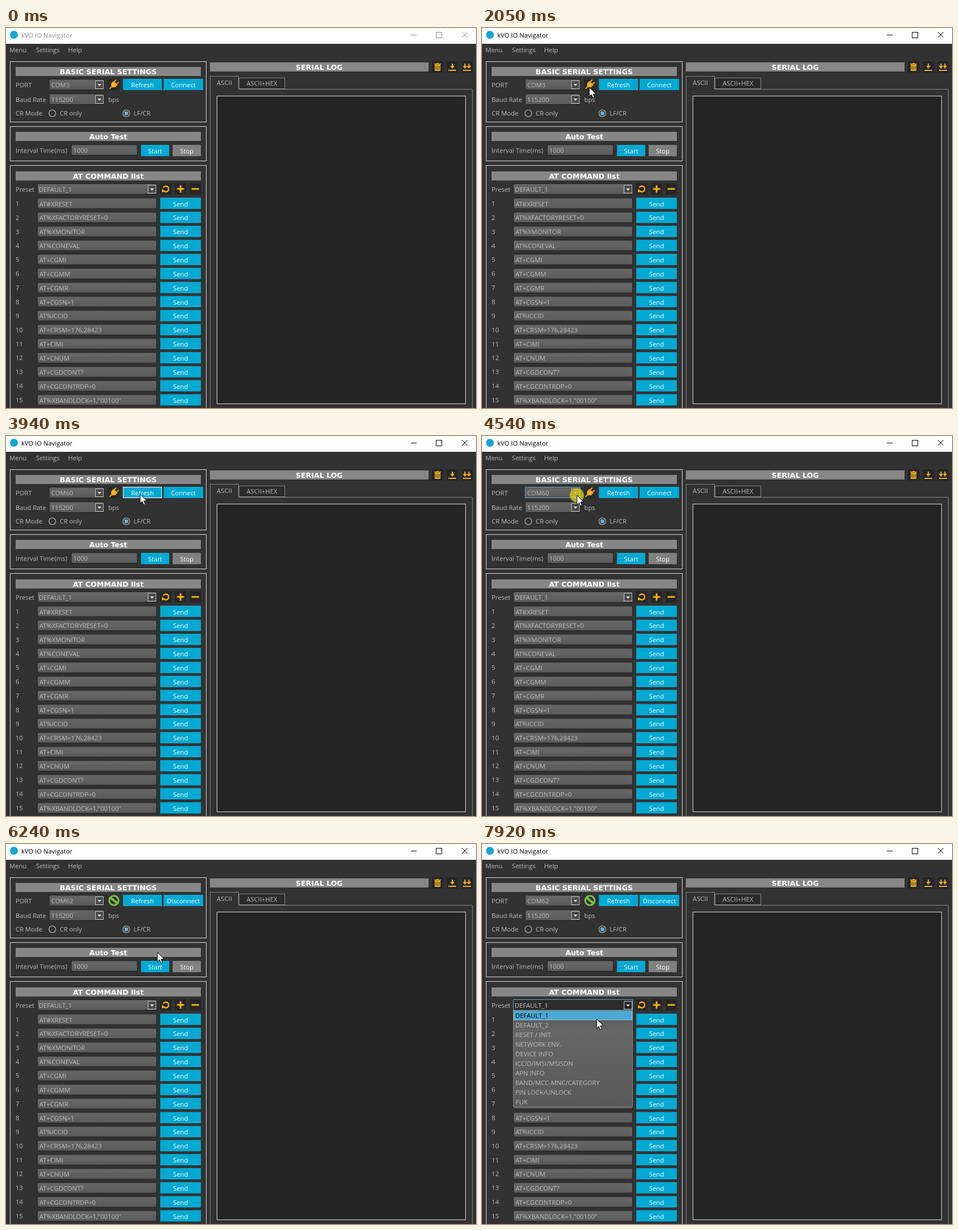
These frames come from a looping animation (832 by 673 pixels, 7990 ms). An HTML page with a canvas:

```html
<!DOCTYPE html>
<html>
<head>
<meta charset="utf-8">
<style>
html, body { margin: 0; width: 100%; height: 100%; overflow: hidden; background: #323232; }
canvas { display: block; }
</style>
</head>
<body>
<canvas width="832" height="673"></canvas>
<script>
const c = document.querySelector('canvas').getContext('2d');
const LOOP = 7990, STEP = LOOP / 119;
const UI = '11.3px "Open Sans", "Noto Sans", sans-serif';
const HEAD = 'bold 12.7px "DejaVu Sans", sans-serif';
const BLUE = '#00a9d2', GOLD = '#f2b01e', GREEN = '#7cc243';
const LABEL = '#bdbdbd', EDGE = '#858585', GROUP = '#dcdcdc';

const COMMANDS = ['AT#XRESET', 'AT%XFACTORYRESET=0', 'AT%XMONITOR', 'AT%CONEVAL', 'AT+CGMI', 'AT+CGMM',
  'AT+CGMR', 'AT+CGSN=1', 'AT%ICCID', 'AT+CRSM=176,28423', 'AT+CIMI', 'AT+CNUM', 'AT+CGDCONT?',
  'AT+CGCONTRDP=0', 'AT%XBANDLOCK=1,"00100"'];
const PRESETS = ['DEFAULT_1', 'DEFAULT_2', 'RESET / INIT.', 'NETWORK ENV.', 'DEVICE INFO',
  'ICCID/IMSI/MSISDN', 'APN INFO', 'BAND/MCC-MNC/CATEGORY', 'PIN LOCK/UNLOCK', 'PUK'];
const PORTS = ['COM60', 'COM61', 'COM62', 'COM3'];

// The pointer rests on a few spots and glides between them
const START = { x: 790, y: 700 };
const STOPS = [
  { at: 465, x: 359, y: 162, travel: 460 },
  { at: 1450, x: 240, y: 95, travel: 800 },
  { at: 2030, x: 190, y: 105, travel: 380 },
  { at: 2330, x: 164, y: 104 },
  { at: 2730, x: 160, y: 114 },
  { at: 3270, x: 240, y: 112 },
  { at: 3600, x: 238, y: 103 },
  { at: 4150, x: 168, y: 105 },
  { at: 4880, x: 152, y: 149 },
  { at: 5800, x: 312, y: 100, travel: 560 },
  { at: 6210, x: 268, y: 192 },
  { at: 6780, x: 255, y: 276, travel: 480 },
  { at: 7180, x: 255, y: 285 },
  { at: 7920, x: 203, y: 310, travel: 120 }];
const CLICKS = [1320, 2500, 3600, 4560, 5110, 5880, 7400];
const CLICK_TIME = 140;

let mx, my;

const between = (t, a, b) => t >= a && t < b;
const over = (x, y, w, h) => mx >= x && mx < x + w && my >= y && my < y + h;
const clamp = v => Math.max(0, Math.min(1, v));
const ease = p => (1 - Math.cos(Math.PI * p)) / 2;

function rect(x, y, w, h, fill) {
  c.fillStyle = fill;
  c.fillRect(x, y, w, h);
}

function frame(x, y, w, h, color) {
  c.strokeStyle = color;
  c.lineWidth = 1;
  c.strokeRect(x + .5, y + .5, w - 1, h - 1);
}

function text(s, x, y, color = LABEL, align = 'left', font = UI) {
  c.font = font;
  c.textAlign = align;
  c.fillStyle = color;
  c.fillText(s, x, Math.round(y));
}

function trace(points) {
  c.beginPath();
  points.forEach(p => c.lineTo(...p));
}

function poly(points, fill) {
  trace(points);
  c.closePath();
  c.fillStyle = fill;
  c.fill();
}

function stroke(color, width = 1) {
  c.strokeStyle = color;
  c.lineWidth = width;
  c.stroke();
}

function line(points, color, width) {
  trace(points);
  stroke(color, width);
}

function disc(x, y, r, fill) {
  c.beginPath();
  c.arc(x, y, r, 0, 7);
  c.fillStyle = fill;
  c.fill();
}

function ring(x, y, r, color, width, from = 0, to = 2 * Math.PI) {
  c.beginPath();
  c.arc(x, y, r, from, to);
  stroke(color, width);
}

function shade(y, h) {
  const g = c.createLinearGradient(0, y, 0, y + h);
  g.addColorStop(0, '#565656');
  g.addColorStop(.2, '#666');
  g.addColorStop(1, '#595959');
  return g;
}

function heading(s, x, y, w) {
  rect(x, y, w, 16, '#878787');
  text(s, x + w / 2, y + 13, '#fff', 'center', HEAD);
}

function field(s, x, y, w, pad = 4) {
  c.beginPath();
  c.roundRect(x + .5, y + .5, w - 1, 19, 3);
  c.fillStyle = shade(y, 20);
  c.fill();
  stroke('#1e1e1e');
  text(s, x + pad, y + 15, LABEL);
}

function button(s, x, y, w, fill = BLUE) {
  rect(x, y, w, 20, fill);
  if (over(x, y, w, 20)) frame(x, y, w, 20, '#fff');
  text(s, x + w / 2, y + 15, '#fff', 'center');
}

function combo(s, x, y, w, open, pad = 4) {
  field(s, x, y, w, pad);
  if (open) {
    rect(x, y, w, 20, '#2b2b2b');
    text(s, x + pad, y + 15, '#c8c8c8');
  }
  if (open || over(x, y, w, 20)) frame(x, y, w, 20, '#58a8c4');
  const right = x + w;
  rect(right - 16, y + 3, 15, 15, open ? '#222' : '#4a4a4a');
  frame(right - 16, y + 3, 15, 15, '#c4c4c4');
  poly([[right - 12, y + 9], [right - 5, y + 9], [right - 8.5, y + 13]], '#ddd');
}

// Drop-down whose bottom edge slides down, revealing rows from the end
function list(items, x, y, w, step, height = items.length * step) {
  const first = y + height - items.length * step;
  c.save();
  c.beginPath();
  c.rect(x, y, w, height + 1);
  c.clip();
  rect(x, y, w, height + 1, shade(y, height));
  items.forEach((s, i) => {
    const top = first + i * step, picked = over(x, Math.max(y, top), w, step);
    if (picked) {
      rect(x + 1, top, w - 2, step, '#49a9d2');
      c.setLineDash([1, 1]);
      frame(x + 1, top, w - 2, step, '#d8eef6');
      c.setLineDash([]);
    }
    text(s, x + 4, top + step / 2 + 4, picked ? '#000' : LABEL);
  });
  c.restore();
  frame(x, y, w, height + 1, EDGE);
}

function plug() {
  rect(-10, -10, 20, 20, '#292929');
  c.rotate(Math.PI / 4);
  rect(-1, 3, 2, 8, GOLD);
  rect(-5, -4, 10, 6, GOLD);
  disc(0, 1, 4.5, GOLD);
  for (const x of [-4, 2]) rect(x, -9, 2, 5, GOLD);
}

function linked() {
  ring(0, 0, 8.3, GREEN, 3);
  line([[-6, -5], [6, 5]], GREEN, 4);
}

function trash() {
  rect(-5, -4, 10, 11, GOLD);
  rect(-6, -6, 12, 1.5, GOLD);
  rect(-2, -7, 4, 1.5, GOLD);
  for (const x of [-3, 0, 3]) rect(x - .5, -2, 1, 7, '#2a2a2a');
}

function download(...xs) {
  for (const x of xs) {
    rect(x - 1, -6, 2, 5, GOLD);
    poly([[x - 4, -2], [x + 4, -2], [x, 3]], GOLD);
  }
  rect(-7, 5, 14, 2, GOLD);
}

function reload() {
  ring(0, 0, 5, GOLD, 2.5, -2.7, 2.3);
  poly([[-7, 0], [-1, 4], [-7, 6.5]], GOLD);
}

const minus = () => rect(-6.5, -1.5, 13, 3, GOLD);
function plus() {
  minus();
  rect(-1.5, -6.5, 3, 13, GOLD);
}

function at(x, y, draw) {
  c.save();
  c.translate(x, y);
  draw();
  c.restore();
}

function icons(x, y, draws) {
  draws.forEach((draw, i) => at(x + 26 * i, y, () => {
    rect(-10, -10, 20, 20, '#262626');
    draw();
  }));
}

function titleBar(active) {
  const ink = active ? '#000' : '#8d8d8d';
  rect(0, 0, 832, 28, '#fff');
  disc(14, 12, 7, '#16a5d8');
  text('kVO IO Navigator', 27, 17, ink);
  line([[717, 12.5], [727, 12.5]], ink);
  frame(761, 7, 11, 11, ink);
  line([[807, 7], [817, 17]], ink);
  line([[817, 7], [807, 17]], ink);
  text('Menu', 6, 43);
  text('Settings', 53, 43);
  text('Help', 110, 43);
}

function radio(s, x, on) {
  ring(x, 151, 6, '#b8b8b8', 1.2);
  if (on) disc(x, 151, 3.5, '#5db9dd');
  text(s, x + 13, 155);
}

// Rows of the open port list, or nothing while it is closed
function openPorts(t) {
  if (between(t, 2560, 3400)) return ['COM3'];
  if (between(t, 4690, 5230)) return PORTS;
}

function serialSettings(t) {
  frame(7, 59, 348, 108, GROUP);
  heading('BASIC SERIAL SETTINGS', 17, 69, 328);
  const connected = t > 6080;
  text('PORT', 17, 105);
  text('Baud Rate', 17, 131);
  text('bps', 181, 131);
  text('CR Mode', 17, 155);
  combo(t < 3780 ? 'COM3' : t < 5230 ? 'COM60' : 'COM62', 76, 90, 98, openPorts(t));
  combo('115200', 76, 116, 98);
  at(191, 100, connected ? linked : plug);
  button('Refresh', 207, 90, 69);
  button(connected ? 'Disconnect' : 'Connect', 279, 90, 70);
  radio('CR only', 82, false);
  radio('LF/CR', 213, true);
}

function autoTest() {
  frame(7, 174, 348, 62, GROUP);
  heading('Auto Test', 17, 184, 328);
  text('Interval Time(ms)', 17, 221);
  field('1000', 115, 206, 118);
  button('Start', 239, 207, 50);
  button('Stop', 295, 207, 50, '#808080');
}

function commandList(t) {
  frame(7, 243, 348, 500, GROUP);
  heading('AT COMMAND list', 17, 254, 328);
  text('Preset', 17, 290);
  combo(PRESETS[0], 55, 275, 212, t > 7500, 3);
  if (between(t, 7180, 7500)) rect(115, 278, 1, 14, '#ddd');
  icons(283, 285, [reload, plus, minus]);
  COMMANDS.forEach((s, i) => {
    const y = 300.5 + i * 24.86;
    text(i + 1, 17, y + 14.5);
    field(s, 55, y, 212);
    button('Send', 273, y, 72);
  });
}

function serialLog() {
  heading('SERIAL LOG', 361, 61, 387);
  icons(764, 69, [trash, () => download(0), () => download(-3.5, 3.5)]);
  frame(361, 108, 465, 600, EDGE);
  rect(412, 88, 82, 20, '#2a2a2a');
  frame(412, 88, 82, 20, EDGE);
  rect(361, 85, 51, 24, '#323232');
  line([[361.5, 109], [361.5, 85.5], [411.5, 85.5], [411.5, 108]], EDGE);
  text('ASCII', 386.5, 101, LABEL, 'center');
  text('ASCII+HEX', 453, 102, LABEL, 'center');
  rect(373, 120, 441, 546, '#242424');
  frame(373, 120, 441, 546, GROUP);
}

function dropDowns(t) {
  const ports = openPorts(t);
  if (ports) list(ports, 76, 111, 99, 18);
  if (t > 7420) list(PRESETS, 55, 295, 212, 17, 50 + 120 * clamp((t - 7452) / 130));
}

function pointer(t) {
  if (CLICKS.some(a => between(t, a, a + CLICK_TIME))) disc(mx, my, 12.5, 'rgba(212,202,30,.8)');
  at(mx, my, () => {
    trace([[0, 0], [0, 16.5], [3.8, 13], [6.4, 19], [9, 17.9], [6.5, 12], [11.8, 11.8]]);
    c.closePath();
    c.fillStyle = '#fff';
    c.fill();
    stroke('#000');
  });
}

function movePointer(t) {
  ({ x: mx, y: my } = START);
  for (const { at, x, y, travel = 200 } of STOPS) {
    const p = ease(clamp((t - at + travel) / travel));
    mx += (x - mx) * p;
    my += (y - my) * p;
  }
}

function render(now) {
  // Time advances in even steps
  const t = Math.min(LOOP - 1, Math.round((now % LOOP) / STEP) * STEP);
  movePointer(t);
  rect(0, 0, 832, 673, '#323232');
  titleBar(t > 1400);
  serialSettings(t);
  autoTest();
  commandList(t);
  serialLog();
  dropDowns(t);
  pointer(t);
}

const start = performance.now();
function tick() {
  render(performance.now() - start);
  requestAnimationFrame(tick);
}
tick();
</script>
</body>
</html>
```
